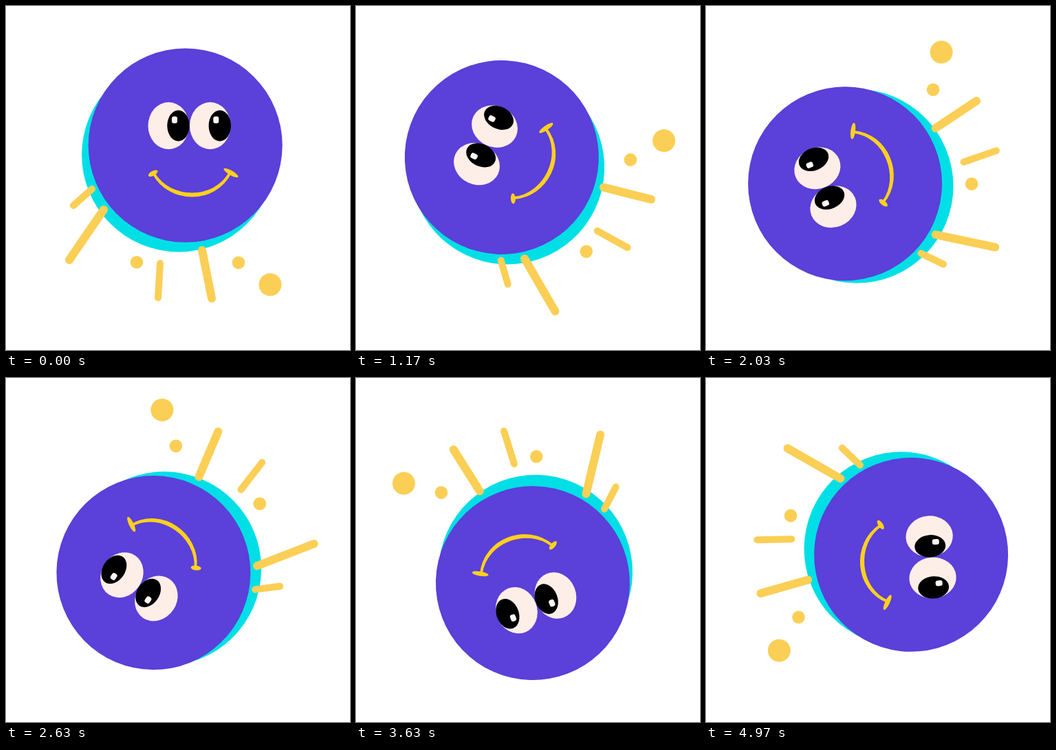
These frames come from a looping animation (500 by 500 pixels, 5.01 s). An HTML page with a canvas:

```html
<!DOCTYPE html>
<html lang="en">
<head>
<meta charset="utf-8">
<title>Rolling smiley</title>
<style>
html, body { margin: 0; width: 100%; height: 100%; overflow: hidden; background: #fff; }
canvas { display: block; width: 500px; height: 500px; }
</style>
</head>
<body>
<canvas id="stage" width="500" height="500"></canvas>
<script>
const ctx = document.getElementById('stage').getContext('2d');
const LOOP = 5010;
const STEP = 1000 / 30;
const TURN = -1.8433 * Math.PI / 180; // rotation per step

const PURPLE = '#5b40d9';
const CYAN = '#00dfe6';
const RAY = '#fbcf55';
const SMILE = '#ffd01c';
const EYE = '#feeee8';

// x1, y1, x2, y2, width
const rays = [
  [125, 266, 98, 290, 10],
  [142, 296, 92, 369, 12],
  [224, 374, 221, 424, 10],
  [285, 355, 299, 425, 12]
];
// x, y, radius
const dots = [[190, 372.5, 9.3], [338, 373, 9.3], [384, 405, 16.5]];

function oval(x, y, rx, ry, color, angle = 0) {
  ctx.fillStyle = color;
  ctx.beginPath();
  ctx.ellipse(x, y, rx, ry, angle, 0, Math.PI * 2);
  ctx.fill();
}

function drawRay([x1, y1, x2, y2, width]) {
  ctx.strokeStyle = RAY;
  ctx.lineWidth = width;
  ctx.beginPath();
  ctx.moveTo(x1, y1);
  ctx.lineTo(x2, y2);
  ctx.stroke();
}

function drawEye(x) {
  oval(x, 174, 29.8, 34.2, EYE);
}

function drawPupil(x) {
  oval(x, 174, 16.2, 22.5, '#000');
  ctx.fillStyle = '#fff6f2';
  ctx.beginPath();
  ctx.roundRect(x - 9.5, 160.5, 8, 10, 3);
  ctx.fill();
}

function drawSmile() {
  const swell = 1.6; // thicker in the middle
  ctx.fillStyle = ctx.strokeStyle = SMILE;
  ctx.lineWidth = 3.8;
  ctx.beginPath();
  ctx.moveTo(215, 244);
  ctx.bezierCurveTo(238, 284 + swell, 303, 286 + swell, 326, 242);
  ctx.bezierCurveTo(303, 286 - swell, 238, 284 - swell, 215, 244);
  ctx.fill();
  ctx.stroke();
  oval(213.7, 243.3, 7.6, 3.4, SMILE, -0.5);
  oval(327, 242.5, 12, 3.4, SMILE, 0.52);
}

function draw(time) {
  const step = Math.min(149, Math.floor((time % LOOP + 4) / STEP));
  ctx.setTransform(1, 0, 0, 1, 0, 0);
  ctx.fillStyle = '#fff';
  ctx.fillRect(0, 0, 500, 500);
  ctx.translate(250, 250);
  ctx.rotate(step * TURN);
  ctx.translate(-250, -250);
  ctx.lineCap = ctx.lineJoin = 'round';

  oval(251.1, 216.4, 141, 141, CYAN);
  oval(260.7, 202.6, 141, 141, PURPLE);
  [236.3, 296.8].forEach(drawEye);
  [250.5, 310.8].forEach(drawPupil);
  drawSmile();
  rays.forEach(drawRay);
  dots.forEach(([x, y, r]) => oval(x, y, r, r, RAY));
}

const start = performance.now();
function tick() {
  draw(performance.now() - start);
  requestAnimationFrame(tick);
}
tick();
</script>
</body>
</html>
```
